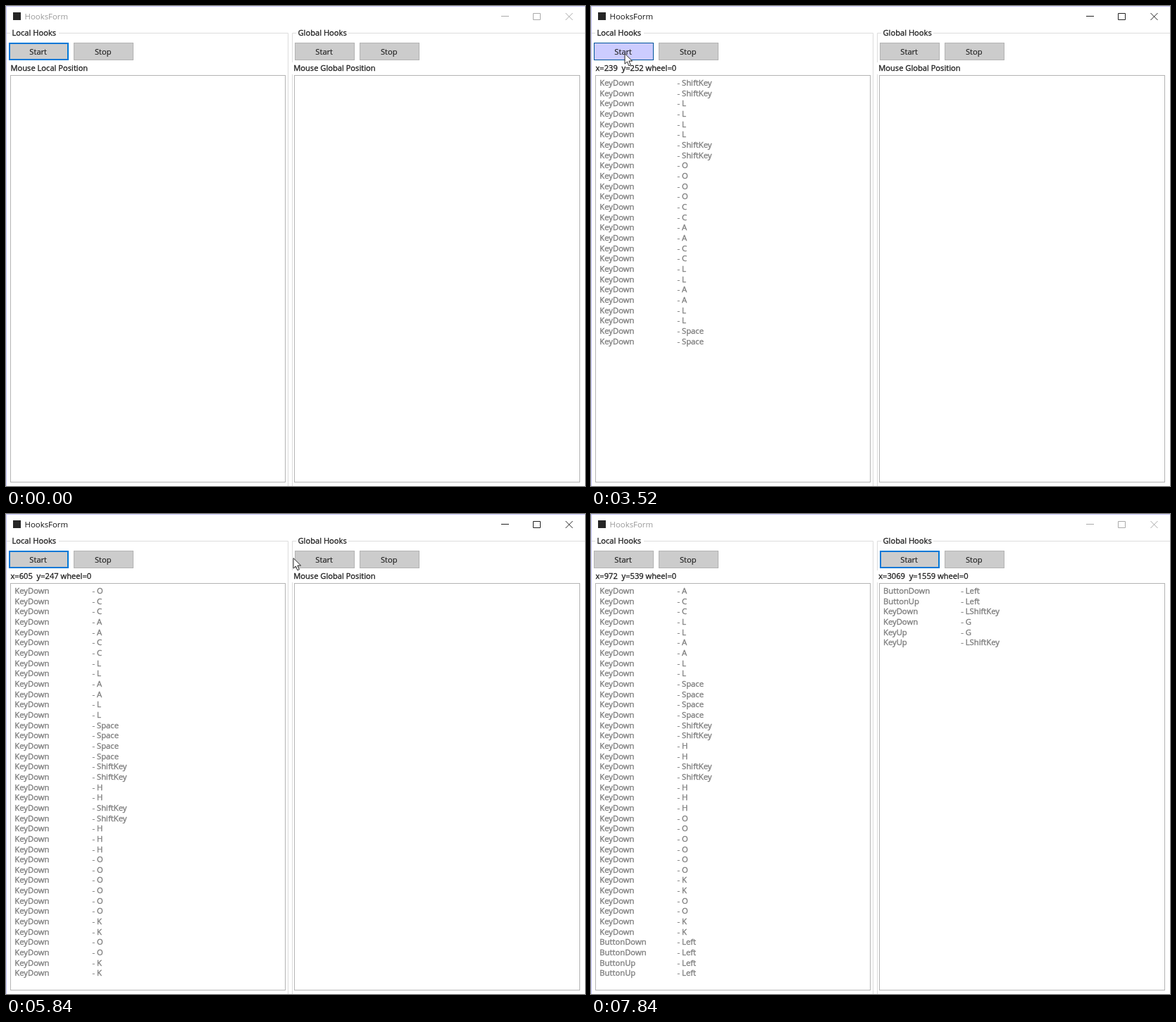
An HTML page for the animation above (8 s loop, 822 by 681 pixels).

```html
<!DOCTYPE html>
<html lang="en">
<head>
<meta charset="utf-8">
<title>HooksForm</title>
<style>
html, body { margin: 0; width: 100%; height: 100%; overflow: hidden; background: #fff; }
svg { display: block; width: 822px; height: 681px; }
text {
  font: 500 11.15px "Open Sans", "Noto Sans", sans-serif; white-space: pre;
  fill: #1c1c1c; stroke: #1c1c1c; stroke-width: .3px;
}
.title { font-weight: 400; font-size: 11.4px; stroke: none; }
.row { font-size: 11.25px; fill: #808080; stroke: #808080; stroke-width: .4px; }
.button { text-anchor: middle; stroke-width: .15px; }
.line { fill: none; stroke: #dcdcdc; }
.box { fill: #fff; stroke: #b4b4b4; }
</style>
</head>
<body>
<svg id="stage" viewBox="0 0 822 681"></svg>
<script>
const LOOP = 8000, ROWS = 38, PITCH = 14.66;
const stage = document.getElementById('stage');

function add(tag, attrs, text) {
  const el = document.createElementNS('http://www.w3.org/2000/svg', tag);
  for (const key in attrs) el.setAttribute(key, attrs[key]);
  if (text) el.textContent = text;
  return stage.appendChild(el);
}
const label = (x, y, text, cls = '') => add('text', { x, y, class: cls }, text);
const line = (d, cls = 'line') => add('path', { d, class: cls });

// Window frame and title bar
add('rect', { width: 822, height: 681, fill: '#fff' });
add('path', { d: 'M0 .5H822M.5 0V681', stroke: '#c3c3f7', fill: 'none' });
add('rect', { x: 10, y: 9, width: 11, height: 11, fill: '#262626' });
const title = label(26.5, 19.3, 'HooksForm', 'title');
const controls = add('path', {
  d: 'M703 14.5H714M748.5 10.5H758.5V19.5H748.5ZM794.5 10L804.5 20M804.5 10L794.5 20',
  fill: 'none'
});

// Group boxes
line('M1 38.5H6M75 38.5H400.5V681');
line('M406.5 80V38.5H412M486 38.5H822M406.5 97V681');
label(8.5, 41.6, 'Local Hooks');
label(414.5, 41.6, 'Global Hooks');
const localLabel = label(6.5, 92.3, 'Mouse Local Position');
const globalLabel = label(408.2, 92.3, 'Mouse Global Position');
add('rect', { x: 6.5, y: 98.5, width: 390, height: 577, class: 'box' });
add('rect', { x: 409.5, y: 98.5, width: 405, height: 577, class: 'box' });

// Buttons
function button(x, text) {
  const rect = add('rect', {});
  label(x + 41.7, 69.2, text, 'button');
  return { x, rect };
}
const buttons = [button(4, 'Start'), button(410, 'Start')];
const stops = [button(96, 'Stop'), button(502, 'Stop')];

function paint(b, look) {
  const [fill, stroke, width] = {
    plain: ['#ccc', '#b3b3b3', 1],
    focus: ['#ccc', '#0078d7', 2],
    hover: ['#cff', '#0078d7', 1],
    press: ['#ccf', '#00549a', 1]
  }[look];
  const inset = width / 2;
  const box = {
    x: b.x + inset, y: 52 + inset, width: 85 - width, height: 25 - width,
    fill, stroke, 'stroke-width': width
  };
  for (const key in box) b.rect.setAttribute(key, box[key]);
}
stops.forEach(b => paint(b, 'plain'));

// Event lists
const names = { S: 'ShiftKey', _: 'Space' };
const keys = 'S2 L4 S2 O4 C2 A2 C2 L2 A2 L2 _4 S2 H2 S2 H3 O6 K2 O2 K2';
const localLog = keys.split(' ').flatMap(k =>
  Array(+k[1]).fill(['KeyDown', names[k[0]] || k[0]]));
localLog.push(['ButtonDown', 'Left'], ['ButtonDown', 'Left'], ['ButtonUp', 'Left'], ['ButtonUp', 'Left']);
const globalLog = [
  ['ButtonDown', 'Left'], ['ButtonUp', 'Left'], ['KeyDown', 'LShiftKey'],
  ['KeyDown', 'G'], ['KeyUp', 'G'], ['KeyUp', 'LShiftKey']
];

function list(x, log, size) {
  const rows = Array.from({ length: size }, (_, i) => {
    const y = 113 + PITCH * i;
    return [label(x, y, '', 'row'), label(x + 110.2, y, '', 'row')];
  });
  return count => {
    const first = Math.max(0, count - ROWS);
    rows.forEach(([kind, key], i) => {
      const entry = first + i < count ? log[first + i] : null;
      kind.textContent = entry ? entry[0] : '';
      key.textContent = entry ? '- ' + entry[1] : '';
    });
  };
}
const showLocal = list(12.3, localLog, ROWS);
const showGlobal = list(415, globalLog, globalLog.length);

const cursor = add('path', {
  d: 'M0 0V14.6L3.4 11.4L5.8 17.2L8.3 16.1L5.9 10.5H10.6Z',
  fill: '#fff', stroke: '#222', 'stroke-width': 1, 'stroke-linejoin': 'round'
});

// Each step changes part of the state and keeps the rest.
const steps = [[0, { at: null, active: false, press: false, focus: 0, local: 0, global: 0, hookL: null, hookG: null }]];
const step = (time, change) => steps.push([time, change]);
const move = (start, gap, points) => points.forEach((at, i) => step(start + gap * i, { at }));

move(190, 96.25, Array.from({ length: 9 }, (_, i) => {
  const k = i / 8, e = k * k * (3 - 2 * k);
  return [705 - 654 * e, 643 - 548 * e];
}));
step(1040, { at: [50, 74] });
step(1130, { at: [48, 67.6] });
step(1230, { press: true, active: true });
step(1320, { press: false });
step(1420, { hookL: 'live' });

const grow = pairs => pairs.forEach(([time, local]) => step(time, { local }));
grow([[2180, 2], [2390, 4], [2480, 6], [2580, 8], [2670, 12], [2770, 14], [2860, 18], [2960, 20], [3050, 24]]);
step(3520, { local: 26, press: true });
step(3620, { local: 30, press: false });
grow([[3810, 34], [3920, 37], [4110, 43], [4200, 45], [4300, 47], [4390, 49]]);

move(5250, 97.5, [
  [60, 75], [112, 98], [185, 106], [262, 101], [328, 88],
  [376, 74], [408, 62.6], [428, 65], [440, 67]
]);
step(6130, { press: true, focus: 1, local: 51 });
step(6220, { press: false, local: 53, hookG: 'live' });
move(6320, 92, [[452, 72], [480, 97], [560, 172], [695, 290]]);
step(6680, { at: null, hookL: [972, 539], hookG: [2931, 1604] });
step(6780, { hookG: [3042, 1618] });
step(6870, { hookG: [3079, 1600] });
step(6970, { active: false, hookG: [3069, 1559], global: 1 });
step(7070, { global: 2 });
step(7460, { global: 3 });
step(7740, { global: 4 });
step(7840, { global: 6 });

const states = [];
steps.forEach(([, change], i) => states.push({ ...states[i - 1], ...change }));

function position(hook, at, scale) {
  if (hook !== 'live') return hook;
  return [239 + (at[0] - 48) * 1.0167, 252 + at[1] - 67.6].map(v => Math.round(v * scale));
}
const report = (p, idle) => p ? `x=${p[0]}  y=${p[1]} wheel=0` : idle;

function draw(s) {
  const at = s.at;
  title.style.fill = s.active ? '#111' : '#999';
  controls.setAttribute('stroke', s.active ? '#222' : '#aaa');
  localLabel.textContent = report(position(s.hookL, at, 1), 'Mouse Local Position');
  globalLabel.textContent = report(position(s.hookG, at, 3), 'Mouse Global Position');
  buttons.forEach((b, i) => {
    const over = at && at[0] >= b.x && at[0] < b.x + 85 && at[1] >= 52 && at[1] < 77;
    const inside = over && (i === 0 || at[0] > b.x + 1);
    paint(b, inside ? (s.press ? 'press' : 'hover') : s.focus === i ? 'focus' : 'plain');
  });
  showLocal(s.local);
  showGlobal(s.global);
  cursor.style.display = at ? '' : 'none';
  if (at) cursor.setAttribute('transform', `translate(${at[0]} ${at[1]})`);
}

let shown = -1;
const begin = performance.now();
function tick() {
  const t = (performance.now() - begin) % LOOP;
  let i = steps.length - 1;
  while (steps[i][0] > t) i--;
  if (i !== shown) draw(states[shown = i]);
  requestAnimationFrame(tick);
}
tick();
</script>
</body>
</html>
```
